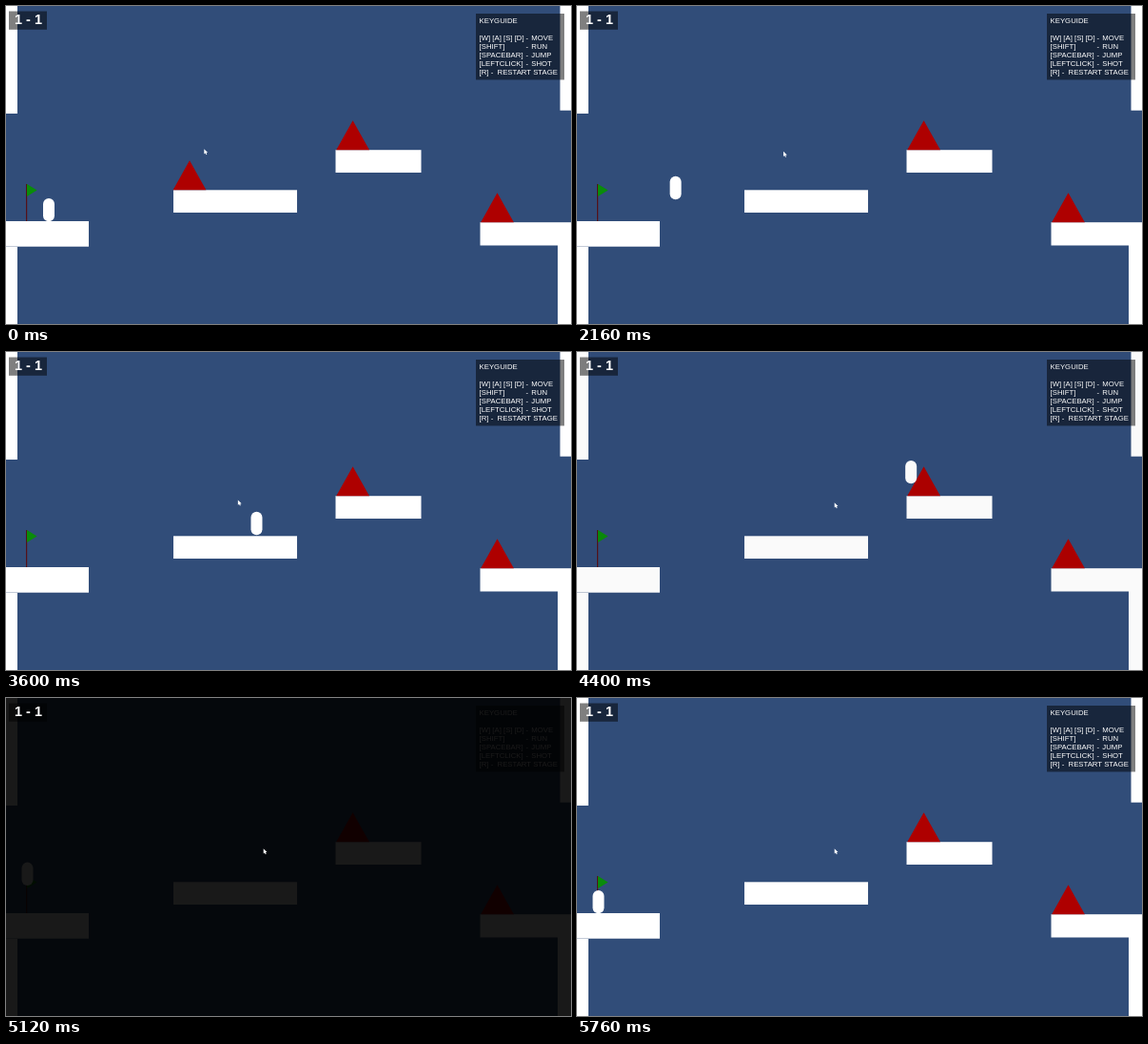
Write an HTML page with a canvas that moves like this. It is 594x334 px and loops after 5.84 s.

```html
<!DOCTYPE html>
<html lang="en">
<head>
<meta charset="utf-8">
<title>Platformer stage</title>
<style>
  html, body { margin: 0; width: 100%; height: 100%; overflow: hidden; background: #314d79; }
  canvas { display: block; width: 594px; height: 334px; }
</style>
</head>
<body>
<canvas id="stage" width="594" height="334"></canvas>
<script>
const ctx = document.getElementById('stage').getContext('2d');
const W = 594, H = 334;
const LOOP = 5840, STEP = 80;

// Player physics, in pixels and milliseconds
const SPEED = 0.111, GRAVITY = 0.000483, JUMP = 0.2367;
const RUN_START = 1893, DEATH = 4390, RESPAWN = 5110;
const FIRST_JUMP = 2050, SECOND_JUMP = 4030;
const GROUND = 226.3, LEDGE = 192.2;

const BLOCKS = [
  [0, 0, 12, 113], [0, 253, 12, 81],
  [582.5, 0, 11.5, 109.7], [580, 251, 14, 83],
  [0, 226, 87, 26.7], [176, 193.3, 130, 23.7],
  [346.5, 151.2, 90, 23.8], [498.5, 227.2, 95.5, 24.3]
];
const SPIKES = [
  { x: 193, base: 193.3, until: 1000 },
  { x: 364.6, base: 151.2, until: LOOP },
  { x: 516.5, base: 227.2, until: LOOP }
];
const KEYS = [
  ['[W] [A] [S] [D]', 'MOVE'], ['[SHIFT]', 'RUN'],
  ['[SPACEBAR]', 'JUMP'], ['[LEFTCLICK]', 'SHOT']
];

const clamp = v => Math.min(1, Math.max(0, v));
const progress = (t, from, to) => clamp((t - from) / (to - from));
const smooth = p => p * p * (3 - 2 * p);

function fill(color, points) {
  ctx.fillStyle = color;
  ctx.beginPath();
  points.forEach(([x, y]) => ctx.lineTo(x, y));
  ctx.fill();
}

function rect(color, x, y, w, h) {
  ctx.fillStyle = color;
  ctx.fillRect(x, y, w, h);
}

const jumpHeight = dt => JUMP * dt - GRAVITY * dt * dt / 2;

// Centre x and bottom y of the player
function playerAt(t) {
  if (t >= 4640) {
    const dt = Math.max(0, t - RESPAWN);
    return [22.5, Math.min(GROUND, 197 + GRAVITY * dt * dt / 2)];
  }
  if (t < RUN_START) return [45 + 29 * progress(t, 400, 661), GROUND];
  const now = Math.min(t, DEATH);
  const x = 74 + SPEED * (now - RUN_START);
  if (now < FIRST_JUMP) return [x, GROUND];
  if (now >= SECOND_JUMP) return [x, LEDGE - jumpHeight(now - SECOND_JUMP)];
  const dt = now - FIRST_JUMP;
  const y = GROUND - jumpHeight(dt);
  return [x, dt > JUMP / GRAVITY ? Math.min(LEDGE, y) : y];
}

function drawPlayer(t) {
  const [x, bottom] = playerAt(t);
  ctx.fillStyle = '#fff';
  ctx.beginPath();
  ctx.roundRect(x - 6, bottom - 24.4, 12, 24.4, 6);
  ctx.fill();
}

function drawGuide() {
  rect('rgba(0,0,0,.5)', 494, 8, 93, 69.5);
  ctx.fillStyle = '#fff';
  ctx.font = '7.75px "Liberation Sans", Arial, sans-serif';
  ctx.fillText('KEYGUIDE', 497.6, 18.3);
  KEYS.forEach(([key, action], i) => {
    const y = 36.3 + i * 8.95;
    ctx.fillText(key, 497.6, y);
    ctx.fillText('-', 546.6, y);
    ctx.fillText(action, 552.3, y);
  });
  ctx.fillText('[R] -  RESTART STAGE', 497.6, 72.1);
}

function drawCursor(t) {
  const a = smooth(progress(t, 200, 700));
  const b = smooth(progress(t, 3300, 3900));
  const x = 208.3 + 8.7 * a + 53.7 * b;
  const y = 150.2 + 2.6 * a + 5.4 * b;
  fill('#fff', [[0, 0], [0, 5.2], [1.2, 4.2], [2.1, 6], [3, 5.6], [2.2, 3.9], [3.8, 3.8]]
    .map(([dx, dy]) => [x + dx, y + dy]));
}

function draw(t) {
  rect('#314d79', 0, 0, W, H);
  BLOCKS.forEach(b => rect('#fff', ...b));
  rect('#551018', 21, 187, 1.2, 39);
  fill('#0a8c0a', [[22, 187], [32.6, 193.6], [22, 200]]);
  SPIKES.filter(s => t < s.until).forEach(({ x, base }) =>
    fill('#ae0000', [[x, base - 31], [x + 17.4, base], [x - 17.4, base]]));
  drawPlayer(t);
  drawGuide();
  rect('rgba(0,0,0,.5)', 3, 5.5, 40, 19.3);

  const light = t < 4900 ? 1 - progress(t, 4396, 4596) : progress(t, 5100, 5300);
  rect(`rgba(0,0,0,${1 - light})`, 0, 0, W, H);

  ctx.fillStyle = '#fff';
  ctx.font = 'bold 14.5px "Liberation Sans", Arial, sans-serif';
  ctx.fillText('1 - 1', 9, 19.2);
  drawCursor(t);
}

function frame() {
  const t = performance.now() % LOOP;
  draw(Math.floor(t / STEP) * STEP);
  requestAnimationFrame(frame);
}
frame();
</script>
</body>
</html>
```
